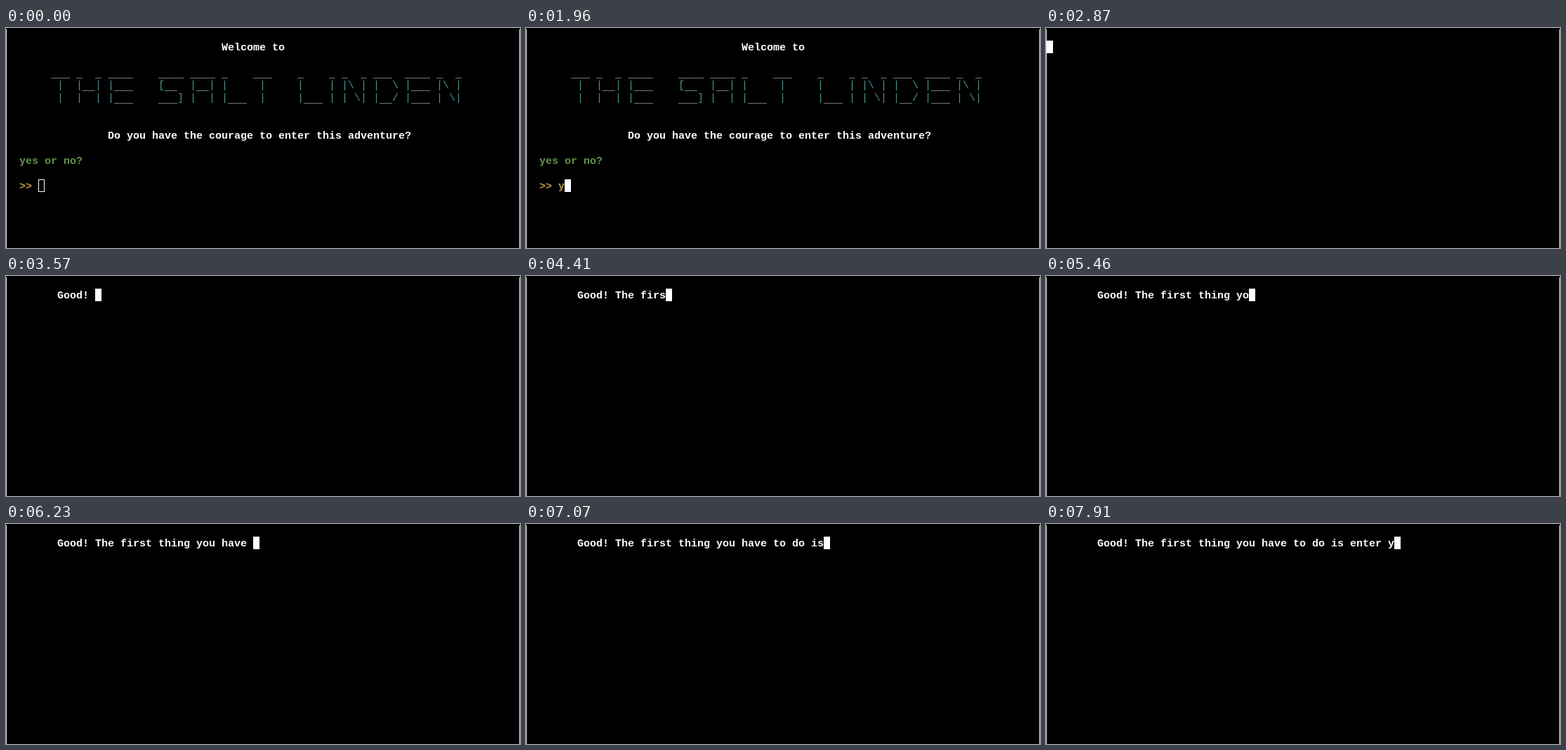
An HTML page with a canvas for the animation above (8 s loop, 732 by 314 pixels).

```html
<!DOCTYPE html>
<html lang="en">
<head>
<meta charset="utf-8">
<title>Terminal adventure</title>
<style>
html, body { margin: 0; width: 100%; height: 100%; overflow: hidden; background: #000; }
canvas { display: block; }
</style>
</head>
<body>
<canvas id="stage" width="732" height="314"></canvas>
<script>
const ctx = document.getElementById("stage").getContext("2d");
const LOOP = 8000, TICK = 70;
const CELL_W = 9, CELL_H = 18;
const WHITE = "#ffffff", TEAL = "#479090", RULE = "#6f7a7a";
const GREEN = "#639648", AMBER = "#bd9a45", EDGE = "#e0e0e0";

const GLYPHS = {
  T: ["___", " | ", " | "],
  H: ["_  _", "|__|", "|  |"],
  E: ["____", "|___", "|___"],
  S: ["____", "[__ ", "___]"],
  A: ["____", "|__|", "|  |"],
  L: ["_   ", "|   ", "|___"],
  I: ["_", "|", "|"],
  N: ["_  _", "|\\ |", "| \\|"],
  D: ["___ ", "|  \\", "|__/"],
  " ": ["  ", "  ", "  "]
};
const TITLE = "THE SALT LINDEN";
const BANNER = [0, 1, 2].map(row => [...TITLE].map(c => GLYPHS[c][row]).join(" "));

const REPLY = "Good! The first thing you have to do is enter y";
const INDENT = 8;
const REPLY_START = 2870, TICKS_PER_CHAR = 1.5115;

const cellX = col => 1 + col * CELL_W;
const cellY = row => row * CELL_H;

function print(text, col, row, color, weight = "bold") {
  ctx.font = weight + ' 15px "Liberation Mono", monospace';
  ctx.fillStyle = color;
  ctx.fillText(text, cellX(col), cellY(row) + 14);
}

function cursor(col, row, hollow) {
  const x = cellX(col), y = cellY(row);
  ctx.fillStyle = ctx.strokeStyle = WHITE;
  if (hollow) ctx.strokeRect(x + 0.5, y + 0.5, CELL_W - 1, CELL_H - 1);
  else ctx.fillRect(x, y, CELL_W, CELL_H);
}

// Underscores become thin rules on the bottom edge of their cells.
function drawBannerLine(line, col, row) {
  print(line.replaceAll("_", " "), col, row, TEAL, "normal");
  ctx.fillStyle = RULE;
  [...line].forEach((c, i) => {
    if (c === "_") ctx.fillRect(cellX(col + i), cellY(row) + CELL_H - 1, CELL_W, 1);
  });
}

function drawWelcome(t) {
  print("Welcome to", 34, 1, WHITE);
  BANNER.forEach((line, i) => drawBannerLine(line, 7, 3 + i));
  print("Do you have the courage to enter this adventure?", 16, 8, WHITE);
  print("yes or no?", 2, 10, GREEN);
  const typed = [1960, 2170, 2450].filter(at => t >= at).length;
  print(">> " + "yes".slice(0, typed), 2, 12, AMBER);
  cursor(5 + typed, 12, t < 770);
}

function drawReply(t) {
  const ticks = Math.floor((t - REPLY_START) / TICK);
  // The first keystroke is the indent.
  const keys = Math.min(REPLY.length + 1, Math.floor((ticks + 0.9) / TICKS_PER_CHAR));
  const typed = Math.max(0, keys - 1);
  print(REPLY.slice(0, typed), INDENT, 1, WHITE);
  cursor(keys ? INDENT + typed : 0, 1);
}

function draw(t) {
  ctx.fillStyle = "#000";
  ctx.fillRect(0, 0, 732, 314);
  ctx.fillStyle = EDGE;
  ctx.fillRect(0, 2, 1, 312);
  ctx.fillRect(731, 2, 1, 312);
  if (t < REPLY_START) drawWelcome(t);
  else drawReply(t);
}

const start = performance.now();
function frame() {
  draw((performance.now() - start) % LOOP);
  requestAnimationFrame(frame);
}
frame();
</script>
</body>
</html>
```
